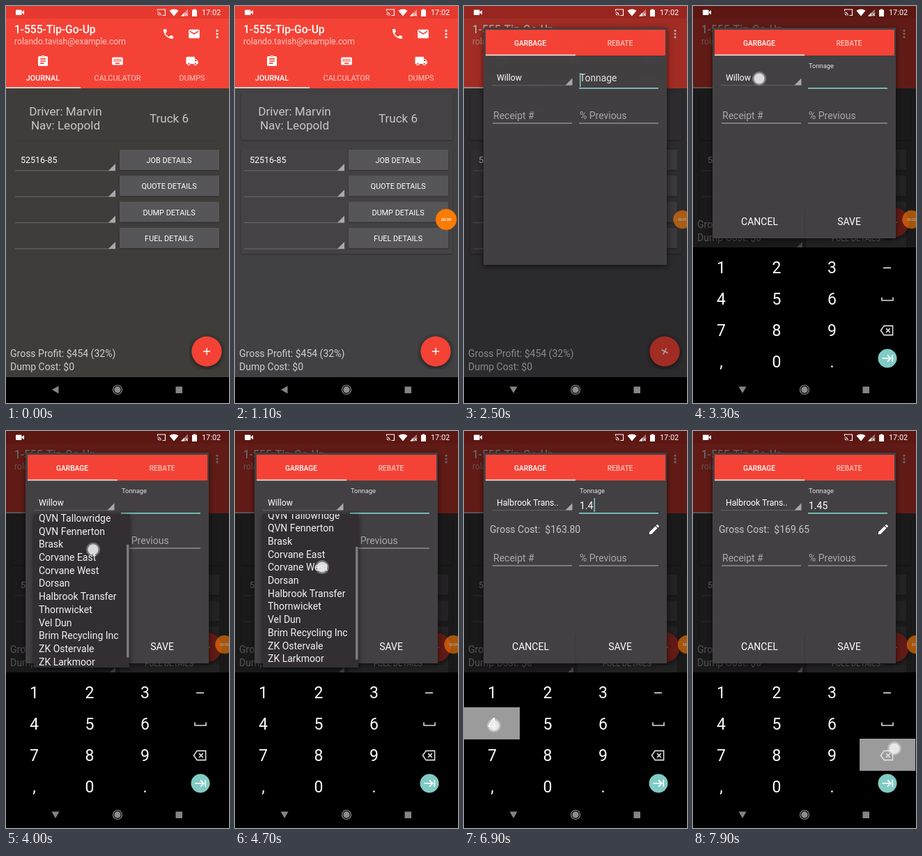
An HTML page that plays this animation: 320x569 px, repeating every 8 s.

```html
<!DOCTYPE html>
<html lang="en">
<head>
<meta charset="utf-8">
<title>Job journal</title>
<style>
html, body { margin: 0; width: 100%; height: 100%; overflow: hidden; background: #000; }
svg { display: block; width: 100%; height: 100%; font-family: Roboto, sans-serif; }
text { white-space: pre; }
</style>
</head>
<body>
<svg id="stage" viewBox="0 0 320 569"></svg>
<script>
const LOOP = 8000;
const RED = '#f44336', TEAL = '#80cbc4', PANEL = '#424143';
const sites = ['Ardley', 'Bexmoor', 'Willow', 'QVN Tallowridge', 'QVN Fennerton', 'Brask',
  'Corvane East', 'Corvane West', 'Dorsan', 'Halbrook Transfer', 'Thornwicket', 'Vel Dun',
  'Brim Recycling Inc', 'ZK Ostervale', 'ZK Larkmoor', 'Zennor'];
const ROW = 18.7, LIST_TOP = 119, LIST_H = 220, LIST_ALL = ROW * sites.length;

// Markup helpers; text is placed by its vertical centre
const text = (x, cy, s, size, fill = '#fff', more = '') =>
  `<text x="${x}" y="${(cy + size * .36).toFixed(2)}" font-size="${size}" fill="${fill}" ${more}>${s}</text>`;
const MID = 'text-anchor="middle"';
const rect = (x, y, w, h, fill, more = '') =>
  `<rect x="${x}" y="${y}" width="${w}" height="${h}" fill="${fill}" ${more}/>`;
const disc = (x, y, r, fill, more = '') => `<circle cx="${x}" cy="${y}" r="${r}" fill="${fill}" ${more}/>`;
const path = (d, fill = '#fff', more = '') => `<path d="${d}" fill="${fill}" ${more}/>`;
const line = (d, color, w, more = '') => path(d, 'none', `stroke="${color}" stroke-width="${w}" ${more}`);
const group = (id, body, more = '') => `<g id="${id}" ${more}>${body}</g>`;
const icon = (name, x, y, scale = .78) =>
  `<g transform="translate(${x} ${y}) scale(${scale}) translate(-12 -12)">${icons[name]}</g>`;
const arrow = (x, y) => path(`M${x} ${y}v-10l-10 10z`, '#a9a8aa');

function keyHoles() {
  let s = '';
  for (let r = 0; r < 2; r++)
    for (let c = 0; c < 5; c++) s += rect(5 + c * 3, 8 + r * 3, 2, 2, RED);
  return s;
}
const icons = {
  phone: path('M6.6 10.8c1.4 2.8 3.8 5.1 6.6 6.6l2.2-2.2c.3-.3.7-.4 1-.2 1.1.4 2.3.6 3.6.6.5 0 1 .4 1 1V20c0 .5-.5 1-1 1-9.4 0-17-7.6-17-17 0-.5.5-1 1-1h3.5c.5 0 1 .5 1 1 0 1.2.2 2.4.6 3.6.1.3 0 .7-.3 1z'),
  mail: rect(2, 4, 20, 16, '#fff', 'rx="2"') + line('M4 7l8 5 8-5', RED, 2),
  dots: [6, 12, 18].map(y => disc(12, y, 2, '#fff')).join(''),
  board: rect(3, 3, 18, 18, '#fff', 'rx="2"') + disc(12, 4, 3, '#fff') + disc(12, 4, 1, RED) +
    line('M7 8h10M7 12h10M7 16h7', RED, 2),
  keys: rect(2, 5, 20, 14, '#fff', 'rx="2"') + keyHoles() + rect(8, 15, 8, 2, RED),
  truck: path('M3 4h14v4h3l3 4v5H1V6a2 2 0 0 1 2-2z') + path('M17 9.5h2.5l2 2.5H17z', RED) +
    [6, 18].map(x => disc(x, 17, 3, '#fff') + disc(x, 17, 1.5, RED)).join(''),
  check: rect(3, 3, 18, 18, '#fff', 'rx="2"') + disc(12, 4, 3, '#fff') + line('M7 12l4 4 7-7', RED, 2.2),
  help: disc(12, 12, 10, '#fff') + text(12, 12.3, '?', 17, RED, MID + ' font-weight="700"'),
  fuel: path('M6 3h6a2 2 0 0 1 2 2v16H4V5a2 2 0 0 1 2-2z') + rect(6, 5, 6, 5, RED) +
    line('M14 13h1.5v5.5a1.8 1.8 0 0 0 3.8 0V8l-3.8-3.8M19 9h-2V7', '#fff', 1.6),
  pencil: path('M3 17.2V21h3.8L17.8 9.9l-3.7-3.7zM20.7 7a1 1 0 0 0 0-1.4l-2.3-2.3a1 1 0 0 0-1.4 0l-1.8 1.8 3.7 3.7z'),
  erase: line('M8 5h13v14H8l-5-7zM11 9l6 6M17 9l-6 6', '#ddd', 1.7),
  enter: line('M3 12h14M12 6.5l5.5 5.5-5.5 5.5M20.5 6v12', '#fff', 2),
};

const rows = ['JOB', 'QUOTE', 'DUMP', 'FUEL'];
const cards = rect(9, 125, 303, 67, '#444345', 'filter="url(#soft)"') +
  rect(9, 205, 303, 150, '#444345', 'filter="url(#soft)"');
const content =
  text(85.5, 151, 'Driver: Marvin', 17.1, '#c6c5c7', MID) +
  text(85.5, 171, 'Nav: Leopold', 17.1, '#c6c5c7', MID) +
  text(234, 161, 'Truck 6', 17.1, '#c6c5c7', MID) +
  text(21, 220.5, '52516-85', 12.45) +
  rows.map((name, i) => {
    const y = 206 + i * 37.3;
    return rect(13, y + 29.5, 144, 1, '#6d6c6e') + arrow(157, y + 30) +
      rect(163, y, 143, 29, '#575558', 'rx="1" filter="url(#soft)"') +
      text(234, y + 15, name + ' DETAILS', 10.9, '#fff', MID);
  }).join('');

const menu = [['Add Job', 212, 'check'], ['Add Quote', 201, 'help'], ['Add Dump', 202, 'truck'], ['Add Fuel', 210, 'fuel']];
const menuY = i => 311 + i * 42.4;
const menuItems = menu.map(([name, x, ic], i) =>
  group('label' + i, rect(x, -13.5, 264 - x, 27, '#333234', 'rx="2" filter="url(#soft)"') +
    text((x + 264) / 2, 0, name, 11.1, '#fff', MID)) +
  group('mini' + i, disc(0, 0, 16, '#e8392f', 'filter="url(#soft)"') + icon(ic, 0, 0, .74))
).join('');

const tab = (x, name, ic, on) => icon(ic, x, 79) +
  text(x, 103, name, 10.9, on ? '#fff' : '#fdcac5', MID + (on ? ' font-weight="500"' : ''));
const header = rect(0, 0, 320, 118, RED) + rect(0, 0, 320, 18, '#e63a30') +
  text(12, 33, '1-555-Tip-Go-Up', 15.6, '#fff', 'font-weight="500"') +
  text(12, 51, 'rolando.tavish@example.com', 12.1, '#fdc6c1') +
  icon('phone', 233, 40) + icon('mail', 270, 40) + icon('dots', 303, 40) +
  tab(53, 'JOURNAL', 'board', 1) + tab(160, 'CALCULATOR', 'keys') + tab(267, 'DUMPS', 'truck') +
  rect(0, 116.3, 107, 1.7, '#f0e4e4');

const status = rect(14, 5.5, 8.5, 7.5, '#fff', 'rx="1"') + path('M22 9l4-3v6.5z') +
  line('M217.5 7V5h11v8.5h-4M217.5 8.8a5 5 0 0 1 4.7 4.7M217.5 11.3a2.3 2.3 0 0 1 2.2 2.2', '#fff', 1.1) +
  path('M234.5 6.8a10 10 0 0 1 13 0L241 14.5z') +
  path('M261 4.5v10h-10z', '#ffffff66') + path('M256 9.5v5h-5z') +
  line('M257.5 10.5l3.5 3.5m0-3.5l-3.5 3.5', '#fff', 1) +
  path('M267 5.5h2v-1h3v1h2v9.5h-7z') + text(281, 9.5, '17:02', 10.9);

const nav = rect(0, 532, 320, 37, '#000') +
  path('M-5 0l9.5-5.5v11z', '#858585', 'id="back"') +
  disc(160, 550, 4.7, '#8c8c8c') + disc(160, 550, 6.5, 'none', 'stroke="#8c8c8c" stroke-width="1.2"') +
  rect(243.5, 545.5, 9.5, 9.5, '#858585');

const field = (x, name) => text(x, 157, name, 14, '#a9a8aa') + rect(x - 1, 167.5, 114, 1, '#b5b4b6');
const dialog = rect(28, 31, 263, 302, PANEL, 'id="box" rx="1" filter="url(#deep)"') +
  rect(31, 34, 258, 37, RED) +
  text(95, 53, 'GARBAGE', 10.2, '#fff', MID + ' font-weight="500"') +
  text(224, 53, 'REBATE', 10.2, '#fdc0ba', MID + ' font-weight="500"') +
  rect(31, 69.5, 129, 1.7, '#eadcdc') +
  text(47, 103, '', 12.2, '#fff', 'id="site"') + rect(40, 113.3, 115, .8, '#6d6c6e') + arrow(155.5, 113.5) +
  `<g id="hint">${text(0, 0, 'Tonnage', 14, '#e4e3e5')}</g>` +
  text(166, 106.5, '', 14, '#fff', 'id="tons"') + rect(165, 117, 114, 1.7, TEAL) +
  rect(166, 96, 1.5, 20, TEAL, 'id="caret"') +
  group('cost', text(37, 141, '', 14, '#c6c5c7', 'id="price"') + icon('pencil', 273, 141)) +
  group('fields', field(42, 'Receipt #') + field(166, '% Previous')) +
  group('actions', rect(159.5, 291, 1, 41, '#393839') +
    text(95.5, 308.5, 'CANCEL', 14, '#fff', MID) + text(224, 308.5, 'SAVE', 14, '#fff', MID));

const dropdown = rect(40, LIST_TOP, 137, LIST_H, '#302f32', 'filter="url(#deep)" id="sheet"') +
  `<g clip-path="url(#listClip)"><g id="list">` +
  sites.map((s, i) => text(47, LIST_TOP + ROW * (i + .5), s, 14, '#f2f2f2')).join('') +
  `</g>` + rect(173, 0, 3.5, LIST_H * LIST_H / LIST_ALL, '#7b7a7c', 'id="thumb"') + '</g>';

const digits = ['123', '456', '789', ',0.'];
const keyboard = rect(0, 346, 320, 190, '#000') + rect(0, 0, 80, 46, '#9b9b9b', 'id="press"') +
  digits.map((r, y) => [...r].map((c, x) =>
    text(40.5 + x * 79.5, 375 + y * 45, c, 23, '#fff', MID)).join('')).join('') +
  rect(273, 374.5, 11, 1.7, '#ddd') + line('M271 417.5v4.5h16v-4.5', '#ddd', 1.6) +
  icon('erase', 278, 465, .95) + disc(279, 505, 13.5, TEAL) + icon('enter', 279, 505, .85);

const stage = document.getElementById('stage');
stage.innerHTML = `<defs>
  <filter id="soft" x="-20%" y="-20%" width="140%" height="150%"><feDropShadow dx="0" dy="1" stdDeviation="1.3" flood-opacity=".32"/></filter>
  <filter id="deep" x="-10%" y="-10%" width="120%" height="120%"><feDropShadow dx="0" dy="2" stdDeviation="4" flood-opacity=".6"/></filter>
  <clipPath id="listClip"><rect id="clip" x="40" y="${LIST_TOP}" width="137" height="${LIST_H}"/></clipPath></defs>` +
  rect(0, 0, 320, 569, '#414042') + rect(0, 118, 320, 420, '#3f3d3a', 'id="tint"') +
  group('cards', cards) + content +
  group('foot', text(6, 498, 'Gross Profit: $454 (32%)', 14, '#cfced0') + text(6, 517, 'Dump Cost: $0', 14, '#cfced0')) +
  rect(0, 118, 320, 414, '#fff', 'id="veil"') + menuItems +
  group('fab', disc(288, 495, 21.5, RED, 'filter="url(#deep)"') +
    group('plus', line('M-5 0H5M0 -5V5', '#fff', 1.5))) +
  header + rect(0, 0, 320, 569, '#000', 'id="dim"') +
  group('dialog', dialog) + group('drop', dropdown) + group('keyboard', keyboard) + nav + status +
  group('bubble', disc(0, 0, 15, '#fb7c05', 'stroke="#d96a08" stroke-width=".8"') +
    text(0, 0, '', 5.6, '#fff', MID + ' font-weight="500" id="clock"')) +
  group('touch', disc(0, 0, 10, '#ffffff55') + disc(0, 0, 7.5, '#f1f1f1d0'));

const el = {};
stage.querySelectorAll('[id]').forEach(n => el[n.id] = n);
const set = (id, props) => { for (const k in props) el[id].setAttribute(k, props[k]); };
const say = (id, s) => { if (el[id].textContent !== s) el[id].textContent = s; };
const smooth = p => p * p * (3 - 2 * p);

// Value at t along [time, value] points
function at(t, points, ease = smooth) {
  if (t <= points[0][0]) return points[0][1];
  for (let i = 1; i < points.length; i++) {
    const [a, u] = points[i - 1], [b, v] = points[i];
    if (t < b) return u + (v - u) * ease((t - a) / (b - a));
  }
  return points[points.length - 1][1];
}
const ramp = (t, a, b) => at(t, [[a, 0], [b, 1]]);
const linear = p => p;

// start, end, x, y, end y
const touches = [
  [1200, 1330, 288, 495], [2030, 2160, 288, 396], [3230, 3370, 95, 104],
  [3600, 4050, 125, 229.4, 162.6], [4550, 4850, 125, 185, 205], [5130, 5260, 100, 237],
  [6220, 6340, 43, 377], [6520, 6640, 200, 508], [6820, 6940, 43, 422], [7190, 7310, 122, 421],
  [7810, 8000, 289, 455],
];
// time, character, column, row
const strokes = [[6220, '1', 0, 0], [6520, '.', 2, 3], [6820, '4', 0, 1], [7190, '5', 1, 1], [7810, '', 3, 2]];

function draw(t) {
  const intro = ramp(t, 100, 500);
  set('tint', { opacity: 1 - intro });
  set('cards', { opacity: .15 + .85 * intro });

  // Action menu
  const close = 1 - ramp(t, 2130, 2400);
  set('veil', { opacity: .48 * ramp(t, 1300, 1600) * close });
  menu.forEach((m, i) => {
    const p = ramp(t, 1340 + (3 - i) * 90, 1580 + (3 - i) * 90) * close;
    set('mini' + i, { transform: `translate(288 ${menuY(i)}) scale(${p})`, opacity: p });
    set('label' + i, { transform: `translate(${(1 - p) * 18} ${menuY(i)})`, opacity: p });
  });
  const turn = at(t, [[1300, 0], [1600, 45], [2350, 45], [2700, 0]]);
  set('plus', { transform: `translate(288 495) rotate(${turn})` });
  const lift = t > 2700 ? 'translate(0 -185)' : '';
  set('fab', { transform: lift });
  set('foot', { transform: lift });

  // Dialog
  const show = ramp(t, 2230, 2510);
  const kb = ramp(t, 2580, 2820);
  set('dim', { opacity: at(t, [[2230, 0], [2500, .34], [2750, .6]], linear) });
  const grow = .9 + .1 * show;
  set('dialog', { opacity: show, transform: `translate(160 200) scale(${grow}) translate(-160 -200)` });
  set('box', { height: 340 - 38 * kb });
  set('actions', { opacity: kb });
  const up = ramp(t, 2470, 2750);
  set('hint', { transform: `translate(166 ${104 - 18 * up}) scale(${1 - up / 3})` });
  say('site', t < 5400 ? 'Willow' : 'Halbrook Trans..');

  // Typed amount
  const done = strokes.filter(k => k[1] && t >= k[0] + 80);
  const tons = done.map(k => k[1]).join('');
  say('tons', tons);
  say('price', 'Gross Cost:  $' + (117 * (parseFloat(tons) || 0)).toFixed(2));
  set('cost', { opacity: tons ? 1 : 0 });
  set('fields', { transform: `translate(0 ${tons ? 25 : 0})` });
  const since = done.length ? t - done[done.length - 1][0] : t - 500;
  const popup = t > 3400 && t < 5500;
  set('caret', {
    x: 166 + (tons ? 1 + el.tons.getComputedTextLength() : 0),
    opacity: !popup && Math.floor(since / 500) % 2 === 0 ? 1 : 0
  });

  // Site list
  const open = ramp(t, 3390, 3580);
  const shown = open * (1 - ramp(t, 5380, 5540));
  const off = at(t, [[3600, 0], [4050, 66.8]], linear) +
    at(t, [[4050, 0], [4400, 12.2], [4550, 12.2], [4850, -7.8]], p => 1 - (1 - p) * (1 - p));
  set('drop', { opacity: shown });
  set('sheet', { height: LIST_H * open });
  set('clip', { height: LIST_H * open });
  set('list', { transform: `translate(0 ${-off})` });
  set('thumb', { y: LIST_TOP + off * LIST_H / LIST_ALL });

  // Keyboard
  set('keyboard', { transform: `translate(0 ${190 * (1 - kb)})` });
  const hit = strokes.find(k => t >= k[0] && t < k[0] + 190);
  set('press', { opacity: hit ? 1 : 0, x: hit ? hit[2] * 79.7 : 0, y: hit ? 351 + hit[3] * 45 : 351 });
  set('back', { transform: `translate(71 550) rotate(${t < 2400 ? 0 : -90})` });

  // Recorder bubble
  const x = at(t, [[2150, 303], [2450, 313.5], [5450, 313.5], [5750, 320]]);
  const size = at(t, [[100, 0], [500, 1], [2150, 1], [2450, .87]]);
  set('bubble', {
    transform: `translate(${x} 306) scale(${size})`,
    opacity: at(t, [[100, 0], [500, 1], [2150, 1], [2450, .62]])
  });
  say('clock', '00:0' + Math.max(0, Math.floor((t - 700) / 1000)));

  const touch = touches.find(k => t >= k[0] && t < k[1] + 90);
  set('touch', { opacity: touch ? 1 - ramp(t, touch[1], touch[1] + 90) : 0 });
  if (touch) {
    const [a, b, tx, y0, y1 = y0] = touch;
    set('touch', { transform: `translate(${tx} ${at(t, [[a, y0], [b, y1]], linear)})` });
  }
}

function tick() {
  draw(performance.now() % LOOP);
  requestAnimationFrame(tick);
}
tick();
</script>
</body>
</html>
```
